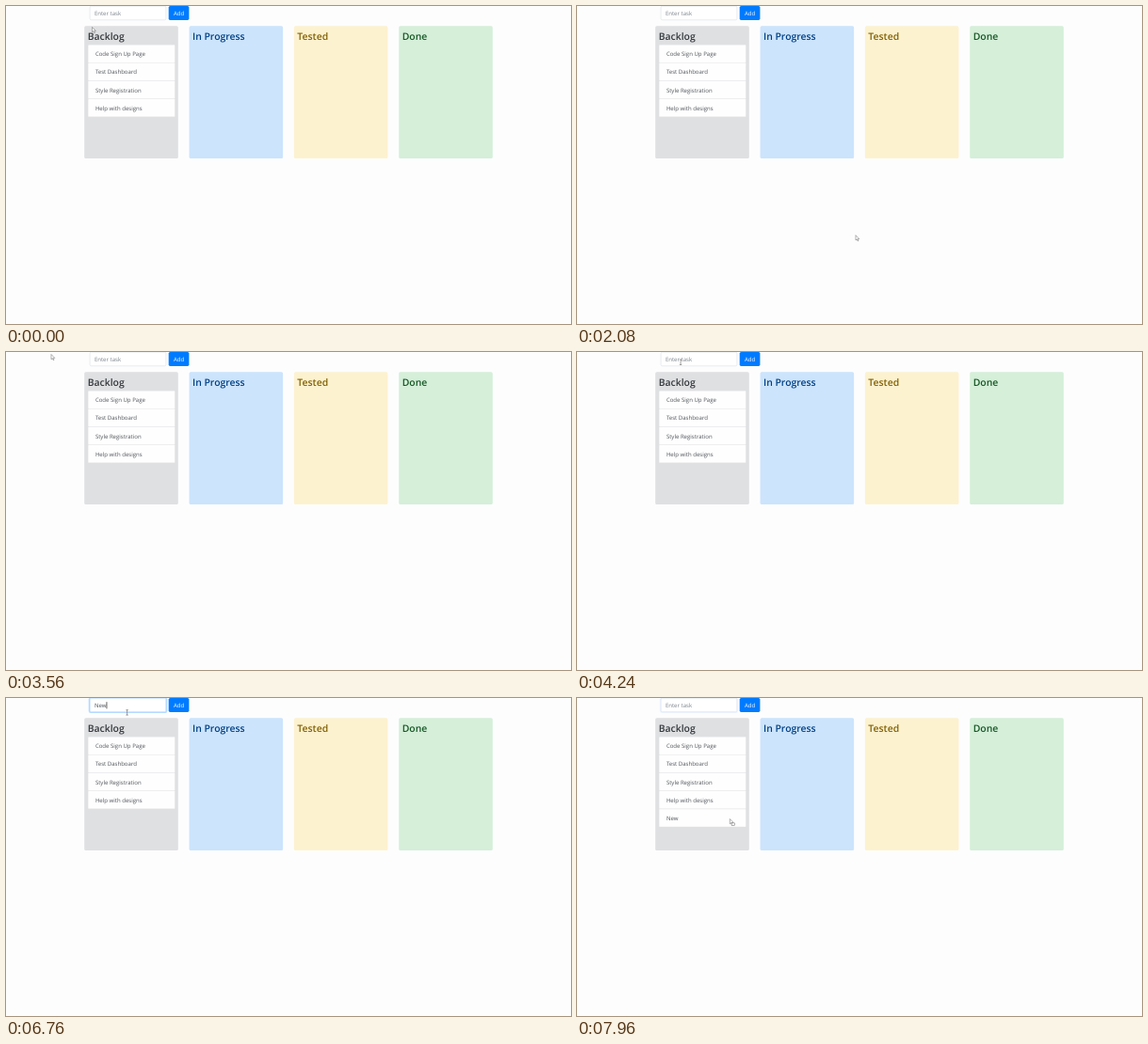
Recreate the animation shown at these times as an HTML page. Size 600x338 px, loop 8000 ms.

```html
<!DOCTYPE html>
<html lang="en">
<head>
<meta charset="utf-8">
<title>Task board</title>
<style>
  html, body { margin: 0; width: 100%; height: 100%; overflow: hidden; background: #fdfdfe; }
  svg { display: block; width: 600px; height: 338px; }
  text { font: 6.05px "Open Sans", "Noto Sans", sans-serif; fill: #50545a; text-rendering: geometricPrecision; }
  .title { font-size: 10.4px; font-weight: 600; }
</style>
</head>
<body>
<svg viewBox="0 0 600 338">
  <rect id="glow" x="88.3" y="-.6" width="82.4" height="16.1" rx="2" fill="none" stroke="#007bff" stroke-width="1.2"/>
  <rect id="field" x="89.1" y=".2" width="80.8" height="14.6" rx="1.4" fill="#fff" stroke-width=".5"/>
  <text id="entry" x="93.9" y="10.1"></text>
  <path id="caret" d="M0 4.2V11.4" stroke="#222" stroke-width=".7"/>
  <rect x="172.7" width="21.7" height="14.9" rx="1.6" fill="#007bff"/>
  <text x="183.6" y="10.1" text-anchor="middle" style="fill:#fff">Add</text>
  <g id="board"></g>
  <g id="pointer">
    <path d="M0 0V5.3L1.3 4.2L2.2 6.2L3 5.8L2.2 3.9H3.8Z" fill="#fff" stroke="#555" stroke-width=".45"/>
    <rect id="drag" x="1.8" y="4.4" width="3.4" height="2.8" fill="#fff" stroke="#666" stroke-width=".5"/>
  </g>
  <path id="beam" d="M-1.2 -2.7H1.2M0 -2.7V2.7M-1.2 2.7H1.2" fill="none" stroke="#555" stroke-width=".55"/>
</svg>
<script>
const LOOP = 8000, FOCUS = 5100, TYPE = 6160, KEY_GAP = 160, ADD = 6800, BLUR = 7840, DRAG = 7900;
const BLINK = 530, FADE = 150, WORD = "New";

// Pointer glides between rests: start, end, then where it stops
const HOME = [91.5, 22.5];
const glides = [
  [440, 960, 115, 42.5],
  [1640, 2160, 308, 257],
  [2160, 2520, 212, 126],
  [2720, 3520, 48, 2.5],
  [3560, 4320, 112, 11],
  [4640, 5080, 128.6, 15.4],
  [7120, 7600, 161, 147],
  [7600, 7920, 162.3, 128.5]
];

const $ = id => document.getElementById(id);
const clamp = v => Math.max(0, Math.min(1, v));
const ease = k => k * k * (3 - 2 * k);
const show = (el, on) => el.setAttribute("display", on ? "inline" : "none");
const place = (el, x, y) => el.setAttribute("transform", `translate(${x} ${y})`);

function add(parent, tag, attrs = {}, text = "") {
  const el = document.createElementNS("http://www.w3.org/2000/svg", tag);
  for (const key in attrs) el.setAttribute(key, attrs[key]);
  el.textContent = text;
  return parent.appendChild(el);
}

const columns = [
  ["Backlog", "#dfe0e2", "#34383c"], ["In Progress", "#cce4fc", "#004085"],
  ["Tested", "#fdf2cf", "#806004"], ["Done", "#d5efd9", "#155724"]
];
columns.forEach(([name, fill, ink], i) => {
  const x = 83.2 + i * 111.33;
  add($("board"), "rect", { x, y: 21.3, width: 99.6, height: 140.7, rx: 1.6, fill });
  add($("board"), "text", { x: x + 3.5, y: 35.6, class: "title", style: "fill:" + ink }, name);
});

const tasks = ["Code Sign Up Page", "Test Dashboard", "Style Registration", "Help with designs", WORD];
const rows = tasks.map((name, i) => {
  const row = add($("board"), "g"), y = 41.1 + i * 19.2;
  add(row, "rect", { x: 87.1, y, width: 92.4, height: 19.2, rx: .8, fill: "#e6e6e8" });
  add(row, "rect", { x: 87.4, y: y + .3, width: 91.8, height: 18.6, rx: .6, fill: "#fefefe" });
  add(row, "text", { x: 94.9, y: y + 12.1 }, name);
  return row;
});

function pointerAt(t) {
  return glides.reduce(([x, y], [from, to, toX, toY]) => {
    const k = ease(clamp((t - from) / (to - from)));
    return [x + (toX - x) * k, y + (toY - y) * k];
  }, HOME);
}

function drawField(t) {
  const keys = Math.max(0, Math.min(WORD.length, Math.floor((t - TYPE) / KEY_GAP) + 1));
  const typed = t < ADD ? WORD.slice(0, keys) : "";
  const focus = clamp((t - FOCUS) / FADE) * clamp(1 - (t - BLUR) / FADE);
  $("glow").setAttribute("opacity", focus * .25);
  $("field").style.stroke = `color-mix(in srgb, #80bdff ${focus * 100}%, #d3d8dd)`;
  $("entry").textContent = typed || "Enter task";
  $("entry").style.fill = typed ? "#495057" : "#7b838a";

  // Each edit restarts the blink
  const edited = t >= ADD ? ADD : keys ? TYPE + (keys - 1) * KEY_GAP : FOCUS;
  show($("caret"), t >= FOCUS && t < BLUR && (t - edited) % (2 * BLINK) < BLINK);
  place($("caret"), 94.4 + (typed ? $("entry").getComputedTextLength() : 0), 0);
}

function drawPointer(t) {
  const [x, y] = pointerAt(t);
  const overField = x > 89 && x < 170 && y < 16;
  show($("pointer"), !overField);
  show($("beam"), overField);
  show($("drag"), t >= DRAG);
  place($("pointer"), x, y);
  place($("beam"), x, y);
}

const start = performance.now();
function tick() {
  const t = (performance.now() - start) % LOOP;
  drawField(t);
  drawPointer(t);
  show(rows[WORD ? rows.length - 1 : 0], t >= ADD);
  requestAnimationFrame(tick);
}
tick();
</script>
</body>
</html>
```
